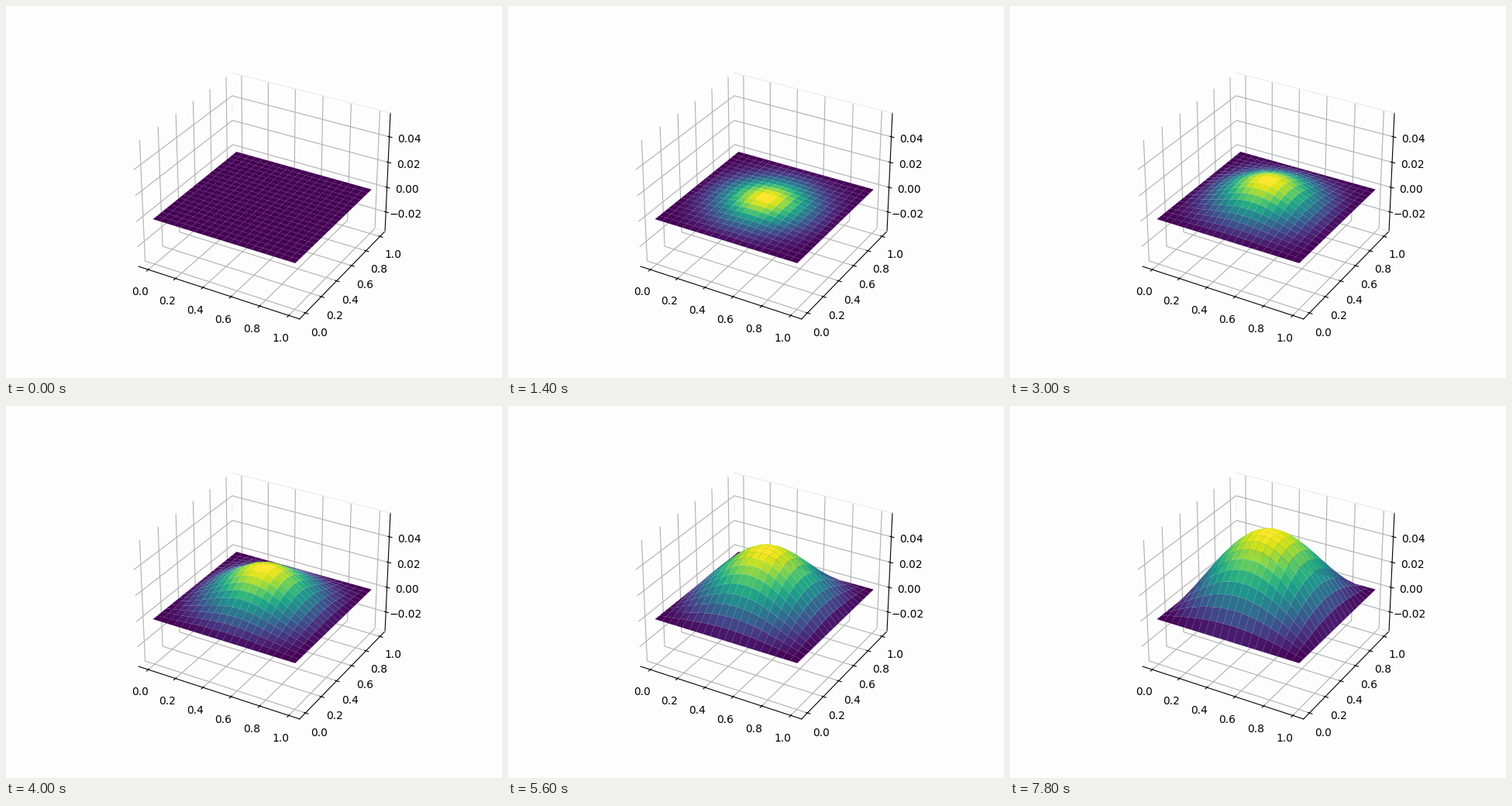
Recreate the animation shown at these times as a matplotlib script. Size 640 px wide and 480 px high, loop 8000 ms.

```python
import numpy as np
import matplotlib.pyplot as plt
from matplotlib.animation import FuncAnimation

FRAMES = 40
INTERVAL = 200
CELLS = 20
SPREAD = 0.2      # width of the Gaussian load
FORCE = 0.0847    # strength of the load
STEP = 0.05       # wave time per frame
BACK = "#fdfdfd"
FAINT = "#ebebeb"

XY = (-0.0729, 1.0729)
Z = (-0.0360, 0.0583)

# Sine modes of a square membrane fixed at its rim
modes = np.arange(1, 14, 2)
fine = (np.arange(400) + 0.5) / 400
load = np.exp(-((fine - 0.5) / SPREAD) ** 2 / 2)
weight = 2 * np.sin(np.pi * np.outer(modes, fine)) @ load / fine.size
coef = FORCE * np.outer(weight, weight)
omega2 = modes[:, None] ** 2 + modes[None, :] ** 2

grid = np.linspace(0, 1, CELLS + 1)
X, Y = np.meshgrid(grid, grid)
basis = np.sin(np.pi * np.outer(modes, grid))


def height(n):
    """Membrane at rest, pushed by a constant load from time zero."""
    amp = coef * (1 - np.cos(np.sqrt(omega2) * STEP * n)) / omega2
    return basis.T @ amp @ basis


fig = plt.figure(figsize=(6.4, 4.8), dpi=100, facecolor=BACK)
ax = fig.add_subplot(projection="3d", facecolor=BACK)
ax.set_xlim(*XY)
ax.set_ylim(*XY)
ax.set_zlim(*Z)
for axis in (ax.xaxis, ax.yaxis, ax.zaxis):
    axis.set_pane_color((1, 1, 1, 0))


def edge(xs, zs):
    """Faint piece of the back wall's outline."""
    ax.plot(xs, (XY[1], XY[1]), zs, color=FAINT, lw=0.8)


edge(XY, (Z[1], Z[1]))
edge((XY[0], XY[0]), (0.0277, 0.0342))
edge((1.0, XY[1]), (Z[0], Z[0]))

surface = None


def draw(n):
    global surface
    if surface is not None:
        surface.remove()
    surface = ax.plot_surface(X, Y, height(n), cmap="viridis")
    return (surface,)


anim = FuncAnimation(fig, draw, frames=FRAMES, interval=INTERVAL,
                     init_func=lambda: draw(0), repeat=True, repeat_delay=0)
plt.show()
```
